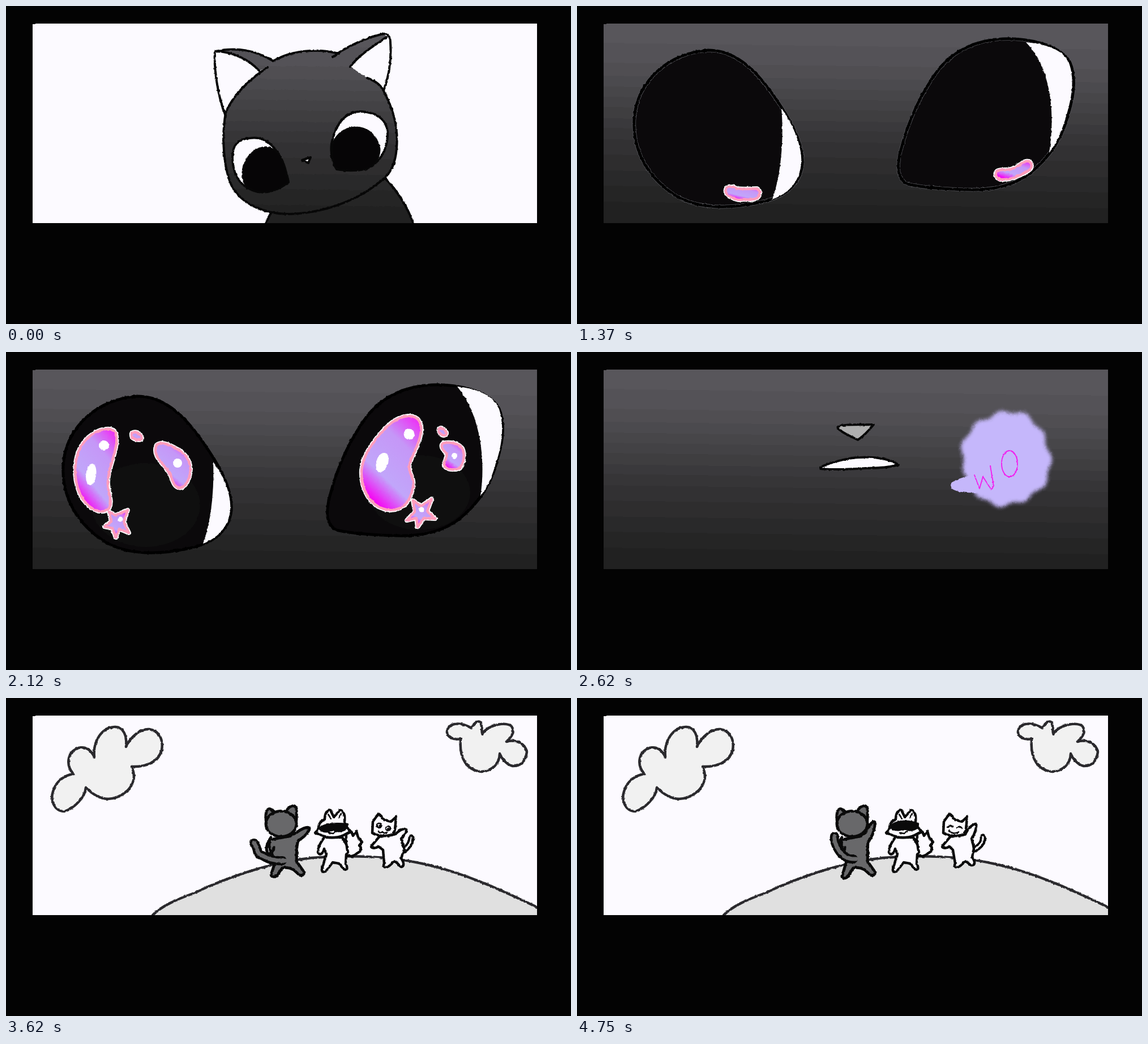
These frames come from a looping animation (998 px wide and 561 px high, 4.87 s). An HTML page:

```html
<!DOCTYPE html>
<html lang="en">
<head>
<meta charset="utf-8">
<title>Curious cat</title>
<style>
  html, body { margin: 0; width: 100%; height: 100%; overflow: hidden; background: #030303; }
  svg { display: block; }
  .scene { filter: url(#rough); stroke-linecap: round; stroke-linejoin: round; }
  .line { fill: none; stroke: #070707; stroke-width: 4; }
  .fur { fill: url(#shade); }
  .white { fill: #fcfaff; }
  .pupil { fill: #060506; stroke: #070707; stroke-width: 3; }
  .rim { fill: none; stroke: #000; stroke-width: 5; }
  .iris { fill: #0b090b; stroke: #55555a; stroke-width: 6.6; }
  .pop { transform-box: fill-box; transform-origin: center; transform: scale(var(--k)); }
  .halo { stroke: #fff; stroke-width: 8; }
  .gem { stroke: #ff9dbc; stroke-width: 4.5; fill: url(#gem); }
  .land { stroke: #2a292d; stroke-width: 4.5; }
  .ink { stroke: #0a0a0a; stroke-width: 4.5; fill: #fcfaff; }
  .grey { stroke-width: 5; fill: #68686a; }
  .thin { stroke-width: 2.6; }
  .open { fill: none; }
</style>
</head>
<body>
<svg width="998" height="561" viewBox="0 0 998 561">
  <defs>
    <clipPath id="screen"><path d="M47 32H52V31H938V383H47Z"/></clipPath>
    <linearGradient id="shade" gradientUnits="userSpaceOnUse" x1="47" y1="31" x2="42.3" y2="383"/>
    <linearGradient id="gem" x1="1" y1="0" x2=".4" y2="1">
      <stop stop-color="#f51cf5"/><stop offset=".35" stop-color="#c597f7"/>
      <stop offset=".75" stop-color="#c1a6fa"/><stop offset="1" stop-color="#f40df4"/>
    </linearGradient>
    <filter id="rough" filterUnits="userSpaceOnUse" x="0" y="0" width="998" height="561" color-interpolation-filters="sRGB">
      <feTurbulence type="fractalNoise" baseFrequency=".2" numOctaves="2" seed="4"/>
      <!-- Opaque noise keeps the displacement centred. -->
      <feColorMatrix result="noise" values="1 0 0 0 0  0 1 0 0 0  0 0 1 0 0  0 0 0 0 1"/>
      <feDisplacementMap in="SourceGraphic" in2="noise" scale="3" xChannelSelector="R" yChannelSelector="G"/>
    </filter>
    <filter id="soft" x="-20%" y="-20%" width="140%" height="140%"><feGaussianBlur stdDeviation="3"/></filter>
  </defs>

  <g clip-path="url(#screen)">
    <path class="white" d="M47 31H938V384H47Z"/>
    <path id="close" class="fur" d="M47 31H938V384H47Z"/>

    <g id="portrait" class="scene">
      <path class="line fur" d="M458 388C461 378 464 371 469 364L669 303C690 325 710 355 721 388"
        data-to="M479 388C482 365 500 350 506 324L679 313C700 335 705 360 718 388"/>
      <path class="fur" d="M388 188C400 160 425 133 455 112L472 97C505 78 550 74 588 84L608 107L638 127C655 133 664 142 668 152C685 185 693 215 690 250C688 278 680 292 669 303C630 338 570 365 500 367C450 367 415 345 400 320C385 290 380 235 388 188"
        data-to="M470 100C490 80 530 72 558 66L577 61C620 60 655 70 688 97L696 124L706 138C718 152 728 165 729 182C734 210 735 230 724 257C712 285 695 302 679 313C640 330 600 335 560 335C530 335 460 315 440 287C405 240 420 165 470 100"/>
      <path class="fur" d="M370 80C410 72 440 78 472 97L460 110L447 114C430 95 400 80 370 80"
        data-to="M512 14C525 -5 540 15 577 62L568 66L558 60C545 20 530 0 512 14"/>
      <path class="fur" d="M577 90C600 72 640 54 668 49L672 55C650 70 625 85 608 107Z"
        data-to="M668 105C700 88 740 84 768 86L774 98C745 98 720 105 700 115Z"/>
      <path class="line" d="M388 194C374 160 367 110 369 80C410 72 440 78 472 97M370 80C400 80 430 95 447 114"
        data-to="M472 97C482 75 492 52 512 14C525 -5 540 15 577 62M512 14C530 0 545 20 558 60"/>
      <path class="line" d="M577 90C600 72 640 54 668 49C676 50 679 55 679 65C681 95 676 125 667 150M672 55C650 70 625 85 608 107"
        data-to="M668 105C700 88 740 84 768 86C775 88 776 93 774 102C768 130 750 160 731 184M774 98C745 98 720 105 700 115"/>
      <path class="line" d="M388 188C400 160 425 133 462 108M472 97C505 78 550 74 588 84M638 127C655 133 664 142 668 152C685 185 693 215 690 250C688 278 680 292 669 303M500 367C450 367 415 345 400 320C385 290 380 235 388 188"
        data-to="M470 100C490 80 530 72 558 67M577 61C620 60 655 70 688 97M706 138C718 152 728 165 729 182C734 210 735 230 724 257C712 285 695 302 679 313M506 324C485 315 455 308 440 287C405 240 420 165 470 100"/>
      <path id="chin" class="line" d="M669 303C630 338 570 365 500 367" data-to="M679 313C640 335 560 340 506 324"/>
      <path class="line white" d="M400 270C399 245 410 234 432 233C455 230 470 243 482 262C492 285 498 300 499 311C480 325 460 330 445 328C418 322 402 305 400 270Z"
        data-to="M435 215C438 190 450 178 470 177C500 176 510 190 515 205C524 225 525 250 523 262C520 270 516 276 513 280C470 282 433 270 435 215Z"/>
      <path class="pupil" d="M459 249C480 252 488 268 493 285C497 300 499 308 499 311C488 320 475 328 455 329C435 328 420 320 418 300C416 275 435 250 459 249Z"
        data-to="M470 178C495 178 510 195 508 215C506 235 503 248 499 259C495 269 490 275 483 277C465 278 440 255 437 230C434 200 445 178 470 178Z"/>
      <path class="line white" d="M575 243C583 205 600 186 628 186C655 188 672 200 674 222C675 250 663 270 648 281C630 291 610 292 584 288C576 275 573 258 575 243Z"
        data-to="M604 245C612 215 635 195 665 191C695 192 713 210 713 228C712 255 697 275 676 285C665 290 653 291 643 289C617 285 600 268 604 245Z"/>
      <path class="pupil" d="M617 214C640 214 656 230 660 252C660 270 650 282 636 288C618 292 600 291 584 287C576 275 574 258 577 243C585 225 598 215 617 214Z"
        data-to="M660 193C680 198 684 220 682 240C680 265 675 280 660 288C645 292 630 289 620 281C608 273 603 262 604 248C610 218 632 194 660 193Z"/>
      <path class="line white" d="M523 272L538 267L534 277Z" data-to="M554 242L567 242L560 249Z"/>
    </g>

    <g id="eyes" class="scene">
      <defs>
        <path id="rims" d="M232 78C290 78 330 130 362 180C385 215 400 250 398 280C393 320 360 338 325 346C270 358 220 358 180 338C125 305 98 255 101 200C105 130 165 82 232 78ZM752 58C790 56 850 66 870 98C885 130 875 170 862 210C847 250 825 275 800 295C765 322 720 325 690 324C650 323 610 320 583 314C565 303 566 285 570 262C585 200 610 150 640 110C670 75 710 60 752 58Z"/>
        <g id="gems">
          <path d="M318 322C325 326 324 334 318 339C311 342 302 342 295 341C288 343 280 342 275 338C265 336 260 328 264 321C268 317 276 318 282 322C295 324 307 322 318 322Z"
            data-to="M180 128C192 130 193 145 190 160C185 185 175 205 176 225C177 245 185 255 178 268C165 280 145 270 132 252C115 225 115 190 125 165C137 140 160 126 180 128Z"/>
          <path d="M798 274C805 278 804 286 798 290C790 295 785 298 778 300C768 306 758 306 748 306C740 304 737 296 742 291C750 287 758 290 766 288C775 285 780 282 785 278C790 274 794 273 798 274Z"
            data-to="M706 105C725 104 731 118 729 133C727 155 712 175 709 190C705 205 718 212 715 230C710 255 700 270 675 271C640 268 622 235 624 200C627 175 640 158 653 141C670 122 683 107 706 105Z"/>
          <path class="pop" d="M262 156C272 148 290 158 303 166C318 176 324 192 321 207C318 222 310 234 300 231C290 228 290 212 283 203C275 190 253 175 262 156Z"/>
          <path class="pop" d="M768 153C780 150 795 153 802 162C807 173 805 188 797 197C788 201 775 200 770 193C768 185 777 178 774 171C768 165 762 158 768 153Z"/>
          <path class="pop" d="M218 135Q227 130 235 140Q238 146 232 147Q216 147 218 135Z"/>
          <path class="pop" d="M761 127Q769 125 774 134Q775 140 768 139Q758 135 761 127Z"/>
          <path class="pop" d="M178 274L190 280L211 271L204 292L213 311L196 304L190 319L184 303L170 300L182 291Z"/>
          <path class="pop" d="M715 254L729 264L748 251L740 273L754 286L734 285L723 301L721 285L704 289L718 274Z"/>
        </g>
      </defs>
      <use id="iris" href="#rims" class="iris"/>
      <use href="#rims" class="rim"/>
      <path class="white" d="M361 180C385 215 398 250 396 278C392 315 370 332 345 341C360 300 366 235 361 180Z"
        data-to="M366 194C385 220 398 250 396 280C392 312 370 330 348 338C362 300 368 245 366 194Z"/>
      <path class="white" d="M793 64C830 67 858 78 868 98C881 130 872 170 862 200C855 225 845 245 834 259C845 190 838 110 793 64Z"
        data-to="M797 61C830 64 860 76 870 98C882 130 875 170 864 200C857 225 848 242 838 254C848 190 838 110 797 61Z"/>
      <g fill="#0f0f0f" class="pop"><ellipse cx="247" cy="270" rx="96" ry="74"/><ellipse cx="730" cy="248" rx="90" ry="66"/></g>
      <g id="sparkle">
        <use href="#gems" class="halo"/>
        <use href="#gems" class="gem"/>
        <g fill="#fff">
          <circle class="pop" cx="169" cy="157" r="9"/><circle class="pop" cx="299" cy="188" r="8"/>
          <circle class="pop" cx="198" cy="287" r="4.5"/><circle class="pop" cx="708" cy="137" r="9.5"/>
          <circle class="pop" cx="788" cy="175" r="5"/><circle class="pop" cx="730" cy="270" r="4.5"/>
          <path class="pop" d="M149 189C160 192 156 226 145 227C132 226 136 188 149 189Z"/>
          <path class="pop" d="M665 170C680 172 668 204 657 205C643 202 650 168 665 170Z"/>
        </g>
      </g>
    </g>

    <g id="wow" class="scene">
      <path class="line" style="fill:#afafaf" d="M460 133C463 128 480 128 524 128C515 139 507 148 496 155C482 148 463 140 460 133Z"/>
      <path class="line white" d="M430 203C455 192 485 186 500 186C530 184 555 190 568 199C550 204 530 205 510 205C480 207 450 208 430 206Z"
        data-to="M319 214C380 195 440 187 500 186C560 185 620 196 660 210C620 245 560 268 510 269C430 269 350 245 319 218Z"/>
      <g id="bubble">
        <g fill="#c5b7fb">
          <path id="puff" filter="url(#soft)"/>
          <path d="M660 235C662 226 680 222 700 216L722 248C690 249 672 248 662 241Z"/>
        </g>
        <g fill="none" stroke="#f31bee" stroke-width="1.8">
          <path d="M702 217L711 241L717 220L732 243L736 236L730 201"/>
          <ellipse cx="764" cy="197" rx="14" ry="23"/>
          <path id="lastLetter" d="M786 175L795 200L801 178L814 198L817 188L812 160"/>
        </g>
      </g>
    </g>

    <g id="hill" class="scene">
      <path class="land" fill="#f1f1f1" d="M141 158C140 175 120 195 103 200C85 200 78 180 83 165C87 148 103 136 119 134C105 118 108 95 128 88C142 85 150 92 156 104C153 75 170 52 192 51C208 50 214 68 212 86C220 68 238 54 253 55C272 58 278 75 275 92C268 115 245 122 222 121C230 140 225 152 215 163C190 185 165 182 141 158Z"/>
      <path class="land" fill="#f1f1f1" d="M803 72C790 75 778 68 779 59C781 45 800 40 822 53C826 45 832 40 837 42C841 45 840 55 841 63C855 45 885 42 893 50C900 60 892 70 884 77C900 72 917 80 920 95C918 112 908 121 895 120C885 118 876 108 872 98C872 115 860 128 840 130C815 128 800 108 803 72Z"/>
      <path class="land" fill="#e0e0e0" d="M259 383C275 367 300 356 330 345C400 312 470 290 540 282C610 276 680 280 730 291C800 305 870 336 942 371V390H259Z"/>

      <path class="ink grey" d="M466 250C462 265 470 275 476 288L468 312C470 317 478 316 480 311L488 300C496 298 502 300 508 303L518 312C525 315 528 310 525 305L513 288C514 275 512 265 516 252C525 246 535 238 536 230C533 225 520 232 512 238L500 244Z"
        data-to="M468 250C465 265 470 275 476 288L468 315C470 320 478 318 480 312L488 300C496 298 502 300 508 303L518 312C525 315 528 310 525 305L513 288C514 275 513 265 514 254C522 245 527 228 526 219C522 215 512 230 509 238L500 244Z"/>
      <path class="ink grey open" d="M468 246C460 257 458 268 463 274Q473 274 473 263"/>
      <g fill="none">
        <path stroke="#0a0a0a" stroke-width="16" d="M488 287C474 288 462 284 453 278C441 276 446 264 438 256"
          data-to="M488 284C478 285 468 278 462 268C456 258 454 250 455 244"/>
        <path stroke="#68686a" stroke-width="7" d="M493 287C474 288 462 284 453 278C441 276 446 264 438 256"
          data-to="M493 284C478 285 468 278 462 268C456 258 454 250 455 244"/>
      </g>
      <path class="ink grey" d="M459 215C458 200 462 192 469 197L480 208M492 203C500 190 510 186 513 195C513 205 514 212 512 222"/>
      <ellipse class="ink grey" cx="486" cy="222" rx="27" ry="22.5"/>

      <path class="ink" d="M601 240L610 236L613 243L619 235L622 246L629 254L624 260C630 265 625 272 620 274C614 280 608 280 600 277Z"/>
      <path class="ink" d="M562 246C556 255 551 262 551 272C553 279 560 275 562 266L566 275L558 302C557 309 564 307 567 303L577 290L588 292L597 302C604 305 603 298 600 292L601 276L604 272L601 258L594 246Z"/>
      <path class="ink" d="M563 214C563 203 568 196 573 198L579 210L590 198C597 198 599 208 598 218L601 226L608 236L600 240C590 247 570 248 560 243L546 238L552 230C552 222 556 217 563 214Z"/>
      <path class="ink thin open" d="M569 205L574 213M588 211L592 204M570 238L578 239L583 236"/>
      <path class="ink" style="fill:#0a0a0a" d="M554 230C565 222 580 221 603 223L598 232C590 236 580 235 578 230C572 237 560 237 554 230Z"
        data-to="M554 227C562 218 580 215 602 222L601 228C594 234 582 234 579 228C572 234 560 234 554 227Z"/>

      <g fill="none">
        <path stroke="#0a0a0a" stroke-width="11" d="M702 269C710 264 716 255 716 246" data-to="M702 267C712 262 718 254 717 245"/>
        <path stroke="#fcfaff" stroke-width="3" d="M702 269C710 264 716 255 716 246" data-to="M702 267C712 262 718 254 717 245"/>
      </g>
      <path class="ink" d="M660 244L648 258C640 264 650 267 658 262L666 268L668 292C664 300 672 300 677 296L686 288C692 290 694 296 698 298C704 297 703 290 698 283L703 268C701 258 699 252 698 248C704 242 708 236 707 232C702 228 692 236 688 240Z"
        data-to="M660 244L648 258C640 264 650 267 658 262L664 268L668 292C664 300 672 300 677 296L686 288C692 290 694 296 698 295C704 294 703 288 698 281L701 266C700 258 698 252 697 248C703 240 706 228 705 222C698 222 690 232 686 240Z"/>
      <path class="ink" d="M647 238L648 218L658 204L668 215L680 218L689 210L687 232L684 241C670 245 655 243 647 238Z"/>
      <g id="awake" class="ink thin open">
        <circle cx="659" cy="225" r="4"/><circle cx="675" cy="230" r="4"/>
        <path d="M660 226h.1M676 231h.1" stroke-width="5"/>
        <path d="M658 235Q660 240 665 236Q668 240 672 237"/>
      </g>
      <path id="smiling" class="ink thin open" d="M655 228Q659 222 664 227M671 229Q676 224 680 230M657 234Q666 242 674 236"/>
    </g>
  </g>
</svg>
<script>
const LOOP = 4870;
const $ = id => document.getElementById(id);
const show = (id, on) => { $(id).style.display = on ? '' : 'none'; };
const numbers = /-?[\d.]+/g;

const morphs = [...document.querySelectorAll('[data-to]')].map(el => ({
  el, from: el.getAttribute('d'), to: el.dataset.to.match(numbers), scene: el.closest('.scene').id
}));

function pose(scene, k) {
  for (const m of morphs) {
    if (m.scene !== scene) continue;
    let i = 0;
    m.el.setAttribute('d', m.from.replace(numbers, n => +n + (m.to[i++] - n) * k));
  }
}

// Value of the latest [time, value] pair that has been reached.
const held = (t, keys) => keys.filter(([time]) => time <= t).pop()[1];

// Fur shading falls in flat bands.
const bands = [31, 65, 100, 123, 142, 160, 178, 198, 215, 235, 262, 290, 317, 345, 383];
$('shade').innerHTML = bands.slice(1).map((end, i) => {
  const k = i / 13, c = [88, 86, 91].map(v => Math.round(v + (33 - v) * k));
  const stop = y => `<stop offset="${(y - 31) / 352}" stop-color="rgb(${c})"/>`;
  return stop(bands[i]) + stop(end);
}).join('');

$('puff').setAttribute('d', 'M' + Array.from({ length: 120 }, (_, i) => {
  const a = i * Math.PI / 60, r = 78 + 3 * Math.cos(11 * a) + 2 * Math.sin(4 * a);
  return `${(758 + r * Math.cos(a)).toFixed(1)} ${(188 + 1.06 * r * Math.sin(a)).toFixed(1)}`;
}).join('L') + 'Z');

const scenes = {
  portrait(t) {
    const k = held(t, [[0, 0], [250, .3], [500, 1]]);
    pose('portrait', k);
    show('chin', k < 1);
  },
  eyes(t) {
    const k = Math.min(4, Math.floor((t - 1370) / 125)) / 4;
    pose('eyes', k);
    $('eyes').style.setProperty('--k', k);
    $('iris').style.stroke = k < 1 ? '' : 'none';
    $('sparkle').setAttribute('transform', held(t, [[0, ''], [2000, 'translate(5 -9)'], [2120, 'translate(4 8)']]));
  },
  wow(t) {
    const k = held(t, [[0, 0], [2750, 1 / 3], [2870, 2 / 3], [3000, 1]]);
    pose('wow', k);
    show('bubble', t >= 2620);
    show('lastLetter', k > 0);
    $('bubble').setAttribute('transform', `translate(757 187) scale(${1 + .78 * k}) translate(-757 -187)`);
  },
  hill(t) {
    const k = held(t, [[0, 0], [4000, .5], [4250, 1], [4370, .15], [4620, .6], [4750, 1]]);
    pose('hill', k);
    show('awake', k < .5);
    show('smiling', k >= .5);
  }
};

let start, last;
function frame(now) {
  start ??= now;
  const t = (now - start) % LOOP;
  const scene = held(t, [[0, 'portrait'], [1370, 'eyes'], [2370, 'wow'], [3620, 'hill']]);
  if (scene !== last) {
    for (const id in scenes) show(id, id === scene);
    show('close', scene === 'eyes' || scene === 'wow');
    last = scene;
  }
  scenes[scene](t);
  requestAnimationFrame(frame);
}
requestAnimationFrame(frame);
</script>
</body>
</html>
```
